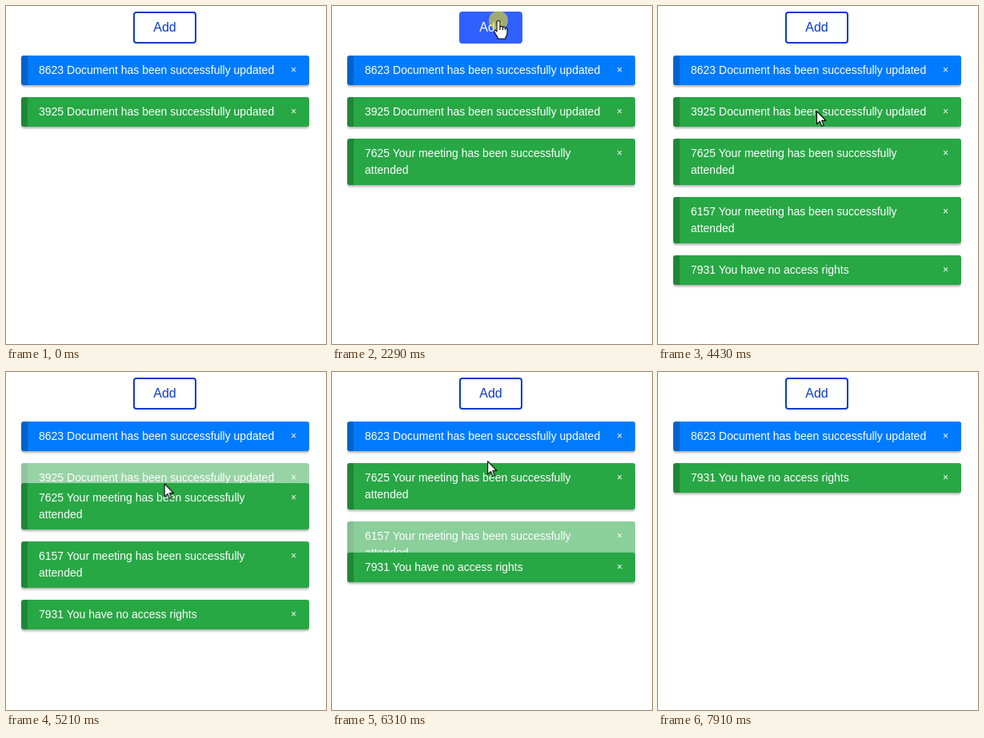
An HTML page for the animation above (8220 ms loop, 400 by 423 pixels).

```html
<!DOCTYPE html>
<html lang="en">
<head>
<meta charset="utf-8">
<title>Notifications</title>
<style>
  html, body { margin: 0; width: 100%; height: 100%; overflow: hidden; background: #fff; }
  body { position: relative; font: 14px/21px "Liberation Sans", Arial, sans-serif; }

  .add, .toast, .cursor, .cursor * { animation: 8220ms ease infinite; }

  .add {
    position: absolute; left: 159px; top: 7px; width: 79px; height: 40px;
    box-sizing: border-box; border: 2px solid #0b3bcb; border-radius: 4px;
    font-size: 16px; line-height: 36px; text-align: center;
    color: #0b3bcb; background: #fff; animation-name: hover;
  }

  .toast {
    position: absolute; left: 19px; top: var(--top); width: 360px;
    box-sizing: border-box; padding: 8px 40px 8px 22px; border-radius: 3px;
    color: #fff; background: linear-gradient(90deg, #0003 8px, #0000 8px) #28a745;
    box-shadow: 0 2px 3px rgba(0, 0, 0, .32); clip-path: inset(0 0 -6px);
  }
  .toast.info { background-color: #007bff; }
  .toast b {
    position: absolute; left: 335px; top: 8px; width: 11px;
    font-size: 12px; font-weight: 400; text-align: center;
  }

  .cursor {
    position: absolute; left: 0; top: 0; width: 1px; height: 1px;
    overflow: visible; animation-name: travel;
  }
  .cursor path { fill: #fff; stroke: #000; stroke-width: 1.1; stroke-linejoin: round; }
  .cursor .ring { fill: rgba(255, 230, 0, .55); animation-name: press; }
  .cursor .arrow { animation-name: arrow; }
  .cursor .hand { animation-name: hand; }
  .cursor .ring, .cursor .arrow, .cursor .hand { animation-timing-function: step-end; }

  @keyframes hover {
    0%, 5.84%, 51.4%, 100% { color: #0b3bcb; border-color: #0b3bcb; background: #fff; }
    7.66%, 49.8% { color: #fff; border-color: #3060ff; background: #3060ff; }
  }

  @keyframes t2 {
    0%, 61.92% { opacity: 1; }
    66.79%, 100% { opacity: 0; }
  }
  @keyframes t3 {
    0%, 13.6% { opacity: 0; }
    18.73% { opacity: 1; }
    61.92% { translate: 0 0; }
    66.79% { translate: 0 -52px; }
    90.02% { opacity: 1; }
    94.89%, 100% { opacity: 0; translate: 0 -52px; }
  }
  @keyframes t4 {
    0%, 31.6% { opacity: 0; }
    36.4% { opacity: 1; }
    61.92% { translate: 0 0; }
    66.79% { translate: 0 -52px; }
    75.43% { opacity: 1; }
    80.29%, 100% { opacity: 0; translate: 0 -52px; }
  }
  @keyframes t5 {
    0%, 46.6% { opacity: 0; }
    51.7%, 100% { opacity: 1; }
    61.92% { translate: 0 0; }
    66.79%, 75.43% { translate: 0 -52px; }
    80.29%, 90.02% { translate: 0 -125px; }
    94.89%, 100% { translate: 0 -198px; }
  }

  @keyframes travel {
    0%, 2.19% { transform: translate(341px, 412px); animation-timing-function: cubic-bezier(.2, .3, .4, 1); }
    7.91%, 48.66% { transform: translate(208px, 18px); animation-timing-function: ease-in-out; }
    53.8%, 61.44% { transform: translate(198px, 131px); animation-timing-function: ease-in; }
    67.7% { transform: translate(195px, 190px); animation-timing-function: ease-out; }
    69.59%, 73.48% { transform: translate(195px, 204px); animation-timing-function: ease-in-out; }
    77.98% { transform: translate(194px, 95px); animation-timing-function: ease-out; }
    80.29%, 83.1% { transform: translate(194px, 79px); animation-timing-function: linear; }
    84.67% { transform: translate(195px, 117px); animation-timing-function: ease-out; }
    85.77%, 90.02% { transform: translate(196px, 130px); animation-timing-function: ease-in-out; }
    93.4% { transform: translate(198px, 109px); animation-timing-function: ease-in; }
    96.2%, 100% { transform: translate(400px, 424px); }
  }
  @keyframes press {
    0%, 11.31%, 29.2%, 44.28%, 59.25%, 72.51%, 87.47%, 100% { opacity: 0; }
    9.85%, 27.85%, 42.94%, 57.9%, 71.17%, 86.13% { opacity: 1; }
  }
  @keyframes arrow {
    0%, 5.84%, 96.2%, 100% { opacity: 0; }
    2.18%, 49.8% { opacity: 1; }
  }
  @keyframes hand {
    0%, 49.8%, 100% { opacity: 0; }
    5.84% { opacity: 1; }
  }
</style>
</head>
<body>
  <div class="add">Add</div>

  <div class="toast info" style="--top: 62px">8623 Document has been successfully updated<b>×</b></div>
  <div class="toast" style="--top: 114px; animation-name: t2">3925 Document has been successfully updated<b>×</b></div>
  <div class="toast" style="--top: 166px; animation-name: t3">7625 Your meeting has been successfully<br>attended<b>×</b></div>
  <div class="toast" style="--top: 239px; animation-name: t4">6157 Your meeting has been successfully<br>attended<b>×</b></div>
  <div class="toast" style="--top: 312px; animation-name: t5">7931 You have no access rights<b>×</b></div>

  <svg class="cursor">
    <circle class="ring" r="12"/>
    <path class="arrow" d="M.5 .5V16.8L4.2 13.3 6.8 19.3 9.2 18.2 6.7 12.4H11.8Z"/>
    <g class="hand">
      <path d="M-2 2Q-2 .5 0 .5T2 2V8Q4 6.5 5.5 8.5 7.5 7.5 8.5 9.5 11 9 11 12V16Q11 19 9 21V23H-1V21Q-4 17 -5 14.5 -5.5 12 -3.5 12L-2 14Z"/>
      <path d="M2 8V12M5.5 8.5V12M8.5 9.5V12"/>
    </g>
  </svg>
</body>
</html>
```
